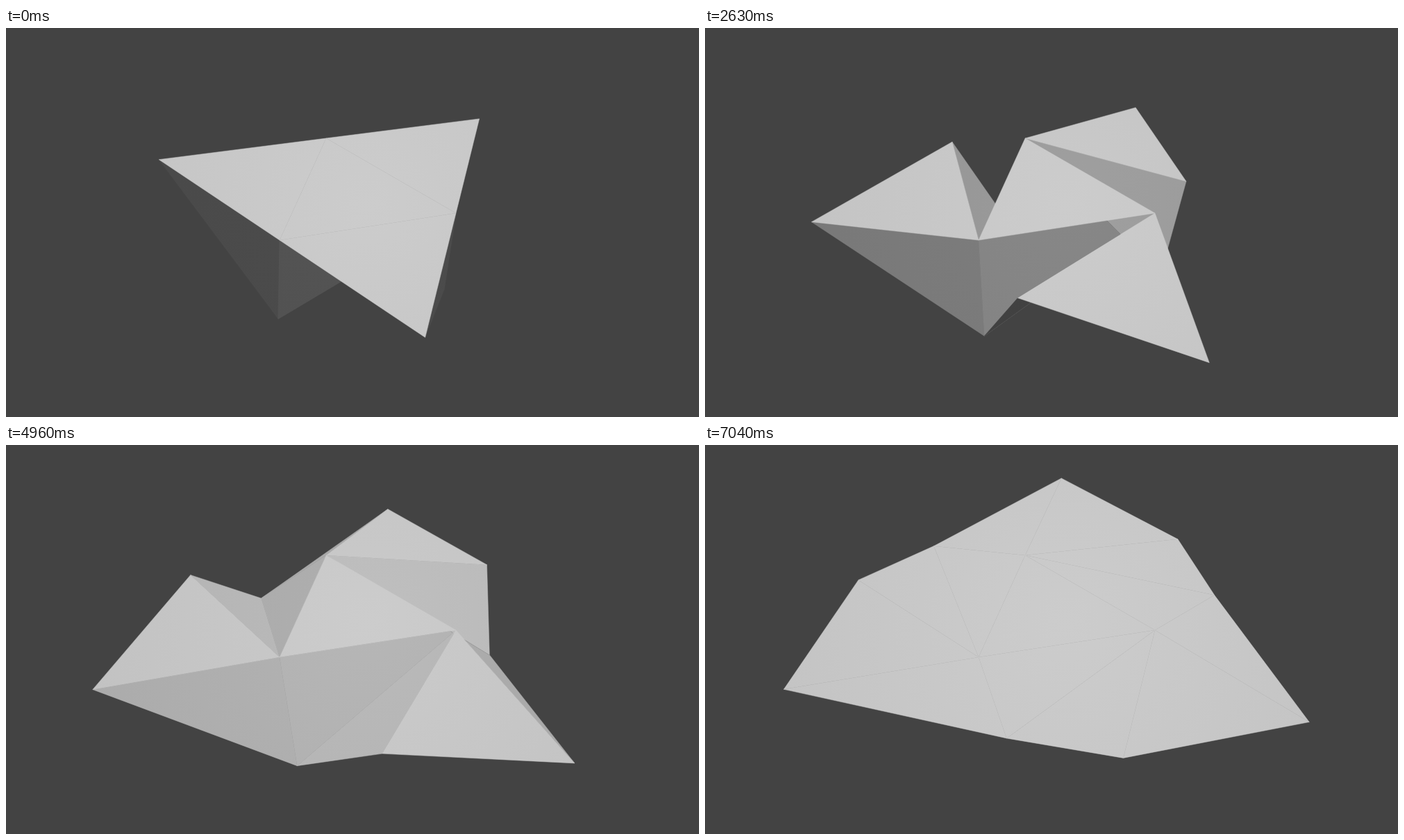
These frames come from a looping animation (998 by 561 pixels, 7080 ms). An HTML page with a canvas:

```html
<!DOCTYPE html>
<html>
<head>
<meta charset="utf-8">
<title>Unfolding triangles</title>
<style>
html, body { margin: 0; width: 100%; height: 100%; overflow: hidden; background: #434343; }
canvas { display: block; }
</style>
</head>
<body>
<canvas id="stage" width="998" height="561"></canvas>
<script>
const ctx = document.getElementById('stage').getContext('2d');
const LOOP = 7080, STEP = 41.65, LAST = 169;
const { sin, cos, sqrt, PI } = Math;

// Model space: unit triangle edge, x right, y away, z down
const add = (a, b) => a.map((v, i) => v + b[i]);
const scale = (a, s) => a.map(v => v * s);
const sub = (a, b) => add(a, scale(b, -1));
const dot = (a, b) => a[0] * b[0] + a[1] * b[1] + a[2] * b[2];
const cross = (a, b) => [
  a[1] * b[2] - a[2] * b[1],
  a[2] * b[0] - a[0] * b[2],
  a[0] * b[1] - a[1] * b[0]
];

// Rotate by thirds of a turn about the centre of the fixed triangle
function turn([x, y, z], n) {
  const a = n * 2 * PI / 3, dx = x - .5, dy = y - sqrt(1 / 12);
  return [.5 + dx * cos(a) - dy * sin(a), sqrt(1 / 12) + dx * sin(a) + dy * cos(a), z];
}

// Camera: model origin and axes in pixels, then perspective
const ORIGIN = [-105, 25.5, 1466];
const AXES = [[261.5, -39.7, 74], [-79.8, -167, 201], [-15.9, 212.9, 170.6]];
const FOCAL = 1466;
function project(p) {
  const [x, y, z] = AXES.reduce((sum, axis, i) => add(sum, scale(axis, p[i])), ORIGIN);
  return [499 + x * FOCAL / z, 280.5 + y * FOCAL / z];
}

const LIGHT = [0, -.06, -1];
function paint(normal) {
  const light = .055 + .55 * Math.max(0, dot(normal, LIGHT));
  const gray = 255 * (1.055 * light ** (1 / 2.4) - .055);
  const fill = ctx.createRadialGradient(520, 255, 0, 520, 255, 420);
  [1, .96].forEach((dim, i) => {
    const v = Math.round(gray * dim);
    fill.addColorStop(i, `rgb(${v},${v},${v})`);
  });
  return fill;
}

function drawFace(face) {
  const [a, b, c] = face.map(project);
  const area = (b[0] - a[0]) * (c[1] - a[1]) - (b[1] - a[1]) * (c[0] - a[0]);
  const n = cross(sub(face[1], face[0]), sub(face[2], face[0]));
  ctx.fillStyle = ctx.strokeStyle = paint(scale(n, Math.sign(area) / (sqrt(dot(n, n)) || 1)));
  ctx.beginPath();
  ctx.moveTo(...a);
  ctx.lineTo(...b);
  ctx.lineTo(...c);
  ctx.closePath();
  ctx.fill();
  ctx.stroke();
}

// Faces around one corner, ordered back to front
function corner(x) {
  const tuck = PI / 2 * (1 - x ** 1.5) ** .8;
  const swing = (60 * (1 - x) - 2.5 * sin(PI * x)) * PI / 180;
  const base = [0, 0, 0], next = [1, 0, 0];
  const tip = scale([0, -cos(tuck), sin(tuck)], sqrt(1 / 3));
  const far = [-cos(swing), sin(swing) * sin(tuck), sin(swing) * cos(tuck)];
  const side = turn(tip, 2);

  // The flap's last point keeps its distance to base, far and side
  const m = dot(far, side), d = 4 / 3 - m * m;
  const f = (2 / 3 - m) / d, s = (1 - m / 2) / d;
  const lift = sqrt(Math.max(0, 1 - f / 2 - s) / d);
  const near = add(add(scale(far, f), scale(side, s)), scale(cross(far, side), lift));

  return [[far, base, tip], [base, next, tip], [near, side, base], [base, far, near]];
}

const middle = [0, 1, 2].map(n => turn([0, 0, 0], n));

function draw(step) {
  ctx.fillStyle = '#434343';
  ctx.fillRect(0, 0, 998, 561);
  ctx.lineWidth = .5;
  ctx.lineJoin = 'bevel';
  for (const face of corner(step / 172))
    for (let n = 0; n < 3; n++) drawFace(face.map(p => turn(p, n)));
  drawFace(middle);
}

const start = performance.now();
function tick() {
  const t = (performance.now() - start) % LOOP;
  draw(Math.min(LAST, Math.floor((t + 3) / STEP)));
  requestAnimationFrame(tick);
}
tick();
</script>
</body>
</html>
```
